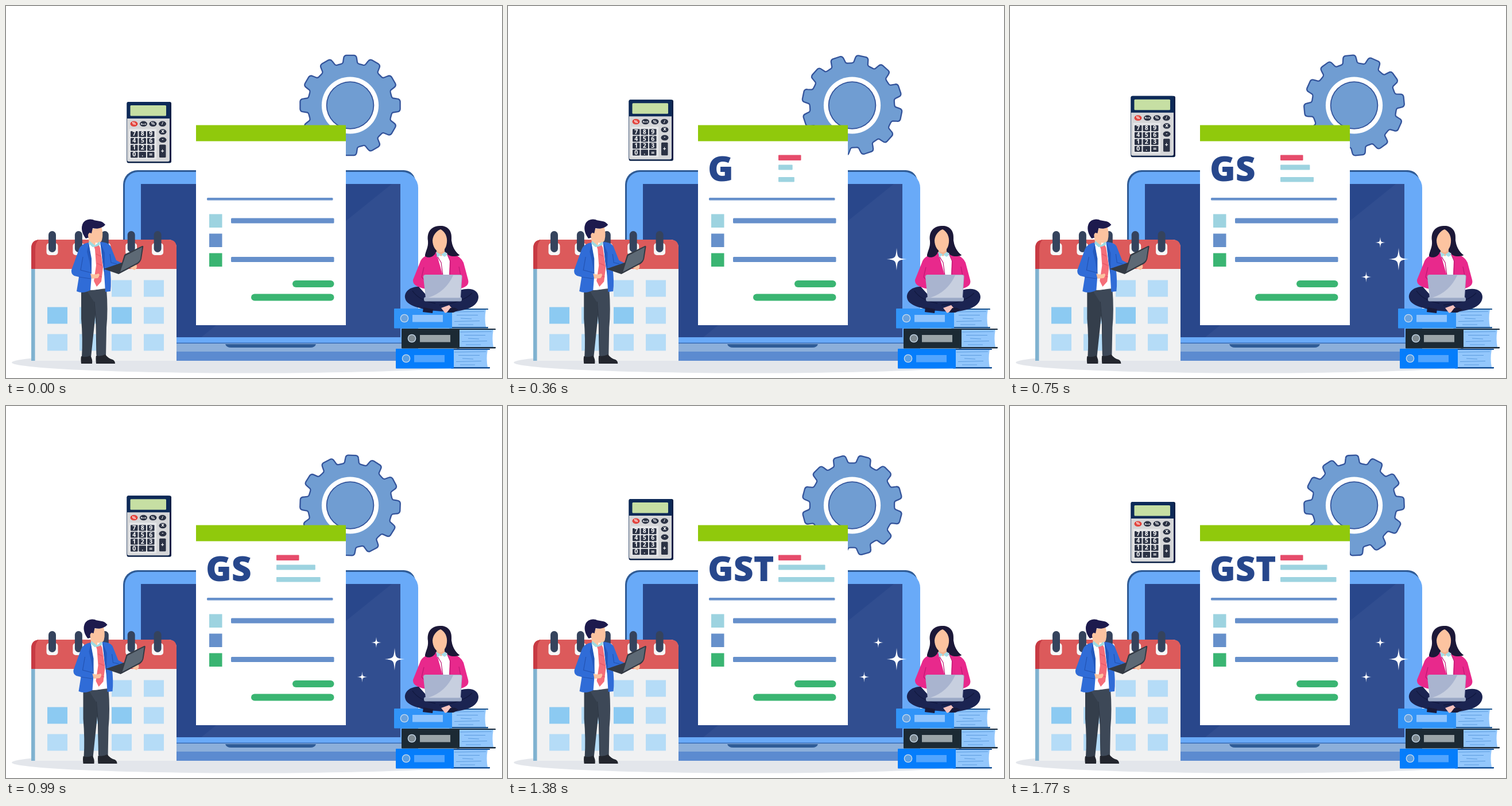
An HTML page with a canvas for the animation above (1800 ms loop, 864 by 648 pixels).

```html
<!DOCTYPE html>
<html lang="en">
<head>
<meta charset="utf-8">
<title>Tax desk</title>
<style>
html, body { margin: 0; width: 100%; height: 100%; overflow: hidden; background: #fff; }
canvas { display: block; width: 864px; height: 648px; }
</style>
</head>
<body>
<canvas id="stage" width="864" height="648"></canvas>
<script>
const ctx = document.getElementById('stage').getContext('2d');
const LOOP = 1800, STEP = 30;
const SKIN = '#fcc3a0', NAVY = '#1d1a4d', CYAN = '#9dd3e0', BLUE = '#6690cb', GREEN = '#3ab572';

function rect(x, y, w, h, fill, r = 0) {
  ctx.fillStyle = fill;
  ctx.beginPath();
  ctx.roundRect(x, y, w, h, r);
  ctx.fill();
}
function oval(x, y, rx, ry, fill) {
  ctx.fillStyle = fill;
  ctx.beginPath();
  ctx.ellipse(x, y, rx, ry, 0, 0, Math.PI * 2);
  ctx.fill();
}
function shape(d, fill) {
  ctx.fillStyle = fill;
  ctx.fill(new Path2D(d));
}
function line(d, color, width) {
  ctx.strokeStyle = color;
  ctx.lineWidth = width;
  ctx.stroke(new Path2D(d));
}
function label(s, x, y, size, color = '#fff') {
  ctx.fillStyle = color;
  ctx.font = `bold ${size}px "Open Sans", sans-serif`;
  ctx.textAlign = 'center';
  ctx.textBaseline = 'middle';
  ctx.fillText(s, x, y);
}
function shifted(x, y, draw) {
  ctx.save();
  ctx.translate(x, y);
  draw();
  ctx.restore();
}

function gearPath(teeth, root, tip) {
  const p = new Path2D(), pitch = Math.PI * 2 / teeth;
  const at = (a, r) => [Math.sin(a) * r, -Math.cos(a) * r];
  for (let i = 0; i < teeth; i++) {
    const a = i * pitch;
    if (i === 0) p.moveTo(...at(a - 0.152, root + 2.5));
    p.lineTo(...at(a - 0.125, tip - 4));
    p.quadraticCurveTo(...at(a - 0.115, tip), ...at(a - 0.075, tip));
    p.lineTo(...at(a + 0.075, tip));
    p.quadraticCurveTo(...at(a + 0.115, tip), ...at(a + 0.125, tip - 4));
    p.lineTo(...at(a + 0.152, root + 2.5));
    p.quadraticCurveTo(...at(a + 0.175, root), ...at(a + 0.22, root));
    p.lineTo(...at(a + pitch - 0.22, root));
    p.quadraticCurveTo(...at(a + pitch - 0.175, root), ...at(a + pitch - 0.152, root + 2.5));
  }
  p.closePath();
  return p;
}
const gearShape = gearPath(12, 72.5, 86.2);

function gear(deg) {
  shifted(599.5, 173, () => {
    ctx.save();
    ctx.rotate(deg * Math.PI / 180);
    ctx.lineJoin = 'round';
    ctx.lineWidth = 4.6;
    ctx.strokeStyle = '#34549b';
    ctx.fillStyle = '#709dd2';
    ctx.stroke(gearShape);
    ctx.fill(gearShape);
    ctx.restore();
    oval(0, 0, 49.6, 49.6, '#fff');
    oval(0, 0, 41.8, 41.8, '#34549b');
    oval(0, 0, 40, 40, '#709dd2');
  });
}

function laptop() {
  rect(204, 286, 509, 320, '#2f5b95', [25, 20, 0, 0]);
  rect(207, 289, 511, 315, '#69aaf8', [23, 28, 0, 0]);
  rect(235, 310, 452, 267, '#29478b');
  shape('M672 310H687V577H340Z', '#314e90');
  rect(230, 577, 470, 11, '#69aaf8');
  rect(230, 588, 470, 14, '#8cafda');
  rect(230, 586.5, 470, 1.5, '#3a6cb3');
  rect(230, 602, 470, 16, '#5c8bd0');
  shape('M382 589H540Q538 595 530 595H392Q384 595 382 589Z', '#2f5c97');
}

function sheet(t) {
  rect(331, 208, 261, 348, '#fff');
  rect(331, 207.5, 261, 28, '#90c90c');
  rect(350, 334, 219.5, 4.5, BLUE, 1.5);
  [CYAN, BLUE, GREEN].forEach((c, i) => rect(354, 362.5 + i * 34, 22.5, 23.5, c));
  rect(392, 369.5, 179.5, 9, BLUE, 1.5);
  rect(392, 437, 179.5, 9, BLUE, 1.5);
  rect(499, 478, 72.5, 12, GREEN, 6);
  rect(427, 501.5, 144.5, 12, GREEN, 6);

  const grow = (full, time) => full * Math.min(1, t / time);
  rect(471, 259.5, grow(39.5, 360), 9.5, '#e64c6b', 1);
  rect(471, 276.5, grow(81.5, 1190), 9, CYAN, 1);
  rect(471, 298, grow(97.5, 1260), 8.5, CYAN, 1);

  const count = [360, 720, 1080].filter(at => t >= at).length;
  ctx.fillStyle = '#27478c';
  ctx.font = '800 60.5px "Open Sans", sans-serif';
  ctx.textAlign = 'left';
  ctx.textBaseline = 'alphabetic';
  ctx.fillText('GST'.slice(0, count), 348, 305);
}

function star(x, y, rx, ry) {
  const k = 0.09;
  shifted(x, y, () => {
    for (let i = 0; i < 4; i++) {
      ctx.save();
      ctx.scale(rx, ry);
      ctx.rotate(i * Math.PI / 2);
      shape(`M0 0V-1C${k}-${k} ${k}-${k} 1 0Z`, '#fff');
      ctx.restore();
    }
    oval(0, 0, rx * 0.12, ry * 0.12, '#fff');
  });
}

function calculator() {
  rect(210.5, 167, 77.5, 106.5, '#0a1f45', 3);
  rect(210.5, 167, 75, 104, '#0d2a58', 3);
  rect(216.5, 173, 62.5, 18.5, '#c6dfa3', 1.5);
  rect(211, 196, 74, 75, '#d5d6d8', [0, 0, 3, 3]);
  rect(214.5, 214, 47.5, 53, '#e6e7e9', 1);
  ['%', 'Back', '%', '/'].forEach((s, i) => {
    oval(223 + i * 16.5, 205.3, 6.5, 4.8, i ? '#2b3244' : '#e2433c');
    label(s, 223 + i * 16.5, 205.5, i === 1 ? 4 : 7);
  });
  ['x', '-'].forEach((s, i) => {
    oval(273, 219.3 + i * 14, 6.5, 4.8, '#2b3244');
    label(s, 273, 218.7 + i * 14, 9);
  });
  rect(267, 241.5, 11.5, 22.5, '#2b3244', 1.5);
  label('+', 272.7, 253, 10);
  [...'7894561230.='].forEach((s, i) => {
    const x = 217 + (i % 3) * 14.5, y = 218 + Math.floor(i / 3) * 12;
    rect(x, y, 12.5, 10.3, '#2b3244', 1);
    label(s, x + 6.2, y + 5.6, 10.5);
  });
}

function calendar() {
  rect(44, 407, 253, 211, '#f0f1f2', [15, 14, 0, 0]);
  shape('M44 458V422Q44 407 59 407H283Q297 407 297 421V458Z', '#dc5a5b');
  shape('M44 458V422Q44 409 57 407Q51 412 51 424V458Z', '#c73a43');
  rect(44, 458, 6.5, 160, '#80b2d0');
  for (let row = 0; row < 3; row++) {
    for (let col = row ? 0 : 2; col < 4; col++) {
      const strong = row === 1 && col % 2 === 0;
      rect(72 + col * 56, 477.5 + row * 47, 35, 29, strong ? '#8ccaf2' : '#b5dcf7');
    }
  }
  for (let i = 0; i < 5; i++) {
    const x = 80.5 + i * 45.9;
    rect(x - 10, 413, 20, 21, '#f6f6f6', 5);
    rect(x - 6.5, 392, 13, 37, '#35435d', 6.5);
  }
}

function man() {
  shape('M131 493L160 497L154 555L148 612H132Q134 580 131 545Z', '#343e4b');
  shape('M141 496L175 492Q178 530 175 560L174 611H158L157 555L153 515Z', '#3d4857');
  line('M154 515L157 552L158 608', '#2c3541', 1);
  shape('M131 610Q138 613 147 609Q151 615 150 623H131Q130 615 131 610Z', '#23262e');
  shape('M157 609Q164 611 173 607Q178 614 186 616Q190 618 190 623H157Q156 614 157 609Z', '#23262e');

  shape('M144 412L164 411L173 432L173 489Q160 496 147 494L145 440Z', '#fff');
  shape('M153 418L161 415L164 421L169 455L166 480L158 489L153 479L157 452L155 424Z', '#f56e79');
  line('M157 432L165 436M158 448L167 452M156 468L167 472', '#e85d6b', 1.5);

  shape('M144 412Q131 414 127 424L114 460Q113 467 119 470L127 472L123 497Q134 502 147 495L149 470L148 440Z', '#306cd7');
  shape('M164 411Q177 411 182 418L192 443L202 448L198 455L181 456Q184 480 182 497L173 498L171 465Z', '#306cd7');
  shape('M144 413L149 440L149 468L145 444L141 428Z', '#2459bd');
  shape('M165 412L172 430L172 470L168 445Z', '#2459bd');
  line('M134 437L130 460L149 465M127 472L147 475M181 432L183 447L193 449', '#2353b2', 1.2);
  shape('M147 466Q154 469 161 466Q165 468 160 474L149 475Z', SKIN);

  shape('M146 387Q157 390 166 384Q170 396 167 408Q164 414 156 412L155 418L145 414L143 400Z', SKIN);
  shape('M145 409L155 417L163 410L164 416L157 419L151 420L144 414Z', '#9ddbe3');
  shape('M139 405C134 399 130 389 133 381C135 374 143 370 151 372C159 376 166 372 173 381C168 387 159 389 151 387L149 396L145 395L145 403Z', NAVY);
  oval(146, 400, 3, 4.5, SKIN);

  shape('M215 456L226 449Q231 455 224 460Z', SKIN);
  shape('M170 458L202 447L213 458L196 467Z', '#343b45');
  shape('M206 434Q207 432 210 431L237 418Q240 417 239 421L236 440Q235 445 230 449L196 467Z', '#333a44');
  shape('M208 435L237 420L234 441Q233 444 229 447L199 463Z', '#5d6975');
}

function book(x, y, cover, edge, ring, tag) {
  rect(x + 96, y, 68, 34.5, edge, 1);
  shape(`M${x + 98} ${y + 2}H${x + 160}Q${x + 164} ${y + 17} ${x + 161} ${y + 32}H${x + 98}Z`, '#93c7fc');
  shape(`M${x + 160} ${y + 2}H${x + 166}V${y + 32}H${x + 160}Q${x + 157} ${y + 17} ${x + 160} ${y + 2}Z`, '#fff');
  for (let i = 0; i < 5; i++) {
    const ly = y + 6 + i * 5.5;
    line(`M${x + 102 + i * 7 % 18} ${ly}L${x + 157 - i * 11 % 25} ${ly + i % 3 - 1}`, '#5798dc', 0.9);
  }
  rect(x, y, 101, 34.5, cover, 1);
  oval(x + 18, y + 17, 7.3, 7.3, '#c9dcee');
  oval(x + 18, y + 17, 6, 6, ring);
  rect(x + 32, y + 11, 53, 12.5, tag);
}

function woman() {
  shape('M755 383C739 384 733 395 735 409C736 421 731 425 730 436C737 440 743 437 748 433H766C772 437 782 438 790 434C781 428 775 416 776 405C777 390 768 382 755 383Z', '#1c1838');
  shape('M750 429C733 433 724 437 721 447L709 477C708 488 722 491 736 494L793 492C802 489 807 485 805 477L797 447C791 434 779 432 766 429Z', '#e8298c');
  shape('M735 420C734 426 730 429 730 436C737 440 744 437 748 431L746 418Z', '#1c1838');
  shape('M766 418L776 408C777 418 782 428 790 434C781 438 771 436 766 430Z', '#1c1838');
  shape('M750 431L768 430L773 442L772 470H761Z', '#fff');
  line('M728 455L724 472L733 483M789 454L792 470L790 484M749 432L758 447L761 469M768 431L774 445L773 468', '#bd1873', 1.2);
  shape('M750 420H764V429L758 436L750 431Z', '#f4b28f');
  shape('M743 408C744 398 750 392 757 389C765 393 769 402 768 412C767 422 761 429 756 429C749 428 743 419 743 408Z', SKIN);
  shape('M749 428L758 433L765 428L769 433L764 437L758 433L751 438Z', '#a5dce7');
  shape('M719 489C704 489 694 497 695 508C697 521 715 525 736 530L772 533C804 531 822 523 823 507C823 495 810 489 791 495L780 510H738Z', '#1b2452');
  line('M708 496Q719 513 748 518M812 500Q795 517 755 521', '#11183e', 1.3);
  shape('M758 526L772 521L778 528L765 535Z', '#f6c2bd');
  shape('M727 525L744 528L743 535L726 533Z', '#191a39');
  shape('M774 526Q784 524 788 530L779 534L768 534Z', '#191a39');
  rect(728, 507, 66, 7.5, '#9ba9c5', 3);
  shape('M727 472Q727 468 731 468H791Q795 468 794.500 472L792 509H731Z', '#a9b4cf');
  shape('M779 469H791Q794 469 793.500 472L791 508H736Q766 498 779 469Z', '#c7cfdf');
}

function render(t) {
  const swing = (1 - Math.cos(Math.PI * 2 * t / LOOP)) / 2;
  rect(0, 0, 864, 648, '#fff');
  oval(425, 621, 415, 18.5, '#e3e6eb');
  gear(t * 58.5 / LOOP);
  laptop();
  sheet(t);
  if (t >= 180) star(677, 441, 17.5, 19.5);
  if (t >= 420) star(620.5, 472, 9, 9.5);
  if (t >= 750) star(645, 412, 9, 9.5);
  shifted(0, -11 * swing, calculator);
  calendar();
  shifted(3.6 * swing, 0, man);
  book(676, 527, '#3194f8', '#1b548f', '#6aa3df', '#90c4fd');
  book(689, 562, '#1c2a34', '#16283a', '#7f8b92', '#9aa4a8');
  book(679, 597, '#057dfb', '#124f96', '#5a9fe4', '#51a4fe');
  woman();
}

const start = performance.now();
function tick() {
  const t = (performance.now() - start) % LOOP;
  render(Math.floor(t / STEP) * STEP);
  requestAnimationFrame(tick);
}
tick();
</script>
</body>
</html>
```
